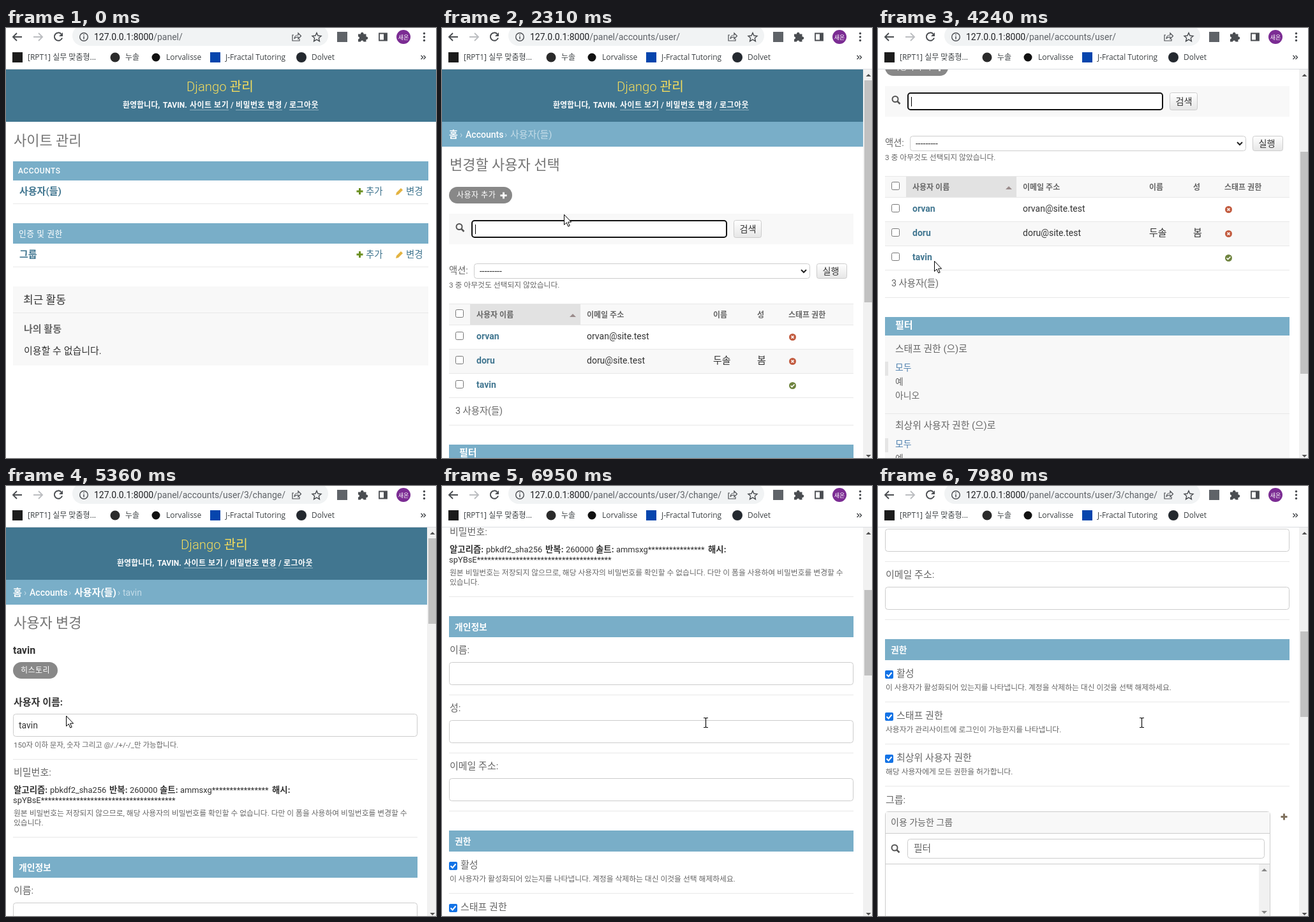
Write an HTML page that moves like this. It is 674 by 674 pixels and loops after 8000 ms.

```html
<!DOCTYPE html>
<html lang="ko">
<head>
<meta charset="utf-8">
<style>
  html, body { margin: 0; width: 100%; height: 100%; overflow: hidden; background: #fff; }
  svg { display: block; width: 100vw; height: 100vh; font-family: Roboto, 'Noto Sans CJK KR', sans-serif; }
  .b { font-weight: 700; }
  .m { font-weight: 500; }
  .l { font-weight: 300; }
  .sp { letter-spacing: .5px; }
  .bar { font-family: 'Open Sans', 'Noto Sans CJK KR', sans-serif; }
  .hover { fill: #003366; text-decoration: underline; }
</style>
</head>
<body>
<svg id="stage" viewBox="0 0 674 674"></svg>
<script>
const DARK = '#333', GREY = '#666', TITLE = '#747474', LINK = '#417690', CAP = '#79aec8', PALE = '#f8f8f8', RULE = '#e8e8e8';
const USER = 'tavin', DURATION = 8000;

// Drawing helpers, each returning SVG markup
const text = (x, y, size, str, fill = DARK, cls = '', more = '') =>
  `<text x="${x}" y="${y}" font-size="${size}" fill="${fill}" class="${cls}" ${more}>${str}</text>`;
const rect = (x, y, w, h, fill, more = '') =>
  `<rect x="${x}" y="${y}" width="${w}" height="${h}" fill="${fill}" ${more}/>`;
const frame = (x, y, w, h, stroke = '#ccc', fill = '#fff', r = 4) =>
  rect(x + .5, y + .5, w - 1, h - 1, fill, `stroke="${stroke}" rx="${r}"`);
const circle = (x, y, r, fill, more = '') => `<circle cx="${x}" cy="${y}" r="${r}" fill="${fill}" ${more}/>`;
const line = (d, stroke, width = 1, more = '') =>
  `<path d="${d}" fill="none" stroke="${stroke}" stroke-width="${width}" ${more}/>`;
const shape = (d, fill, more = '') => `<path d="${d}" fill="${fill}" ${more}/>`;
const group = (id, body, more = '') => `<g id="${id}" ${more}>${body}</g>`;
const rule = (y, w = 634) => rect(11, y, w, 1, RULE);
const plus = (x, y, fill, r = 5) => line(`M${x - r} ${y}h${2 * r}M${x} ${y - r}v${2 * r}`, fill, 3);
const lens = (x, y) => circle(x - 1, y - 1, 4.5, 'none', 'stroke="#555" stroke-width="2"') +
  line(`M${x + 2} ${y + 2}l4.5 4.5`, '#555', 2.5);
const button = (x, y, w, h, label) =>
  frame(x, y, w, h, '#ccc', 'url(#face)', 3) + text(x + 9.5, y + h / 2 + 5, 14.2, label);
const caption = (y, h, w, label, x, size, cls) =>
  rect(11, y, w, h, CAP) + text(x, y + h - 11, size, label, '#fff', cls);
const pill = (id, y, w, label) =>
  rect(11, y, w, 26, '#888', `rx="13" id="${id}"`) + text(23, y + 16.5, 12, label, '#fff', 'm sp');
const checkbox = (x, y, on) => on
  ? rect(x, y, 13, 13, '#1373e6', 'rx="2"') + line(`M${x + 2.5} ${y + 6.5}l3 3 5-6`, '#fff', 2)
  : frame(x, y, 13, 13, '#767676', '#fff', 2);

function header(width, dx) {
  const link = (x, w, label) => text(x, 125, 12, label, '#fff', 'b sp') + rect(x, 128, w, 1, '#8fb0c0');
  const slash = x => text(x, 125, 12, '/', '#fff', 'm');
  return rect(0, 65, width, 82, '#417690') + `<g transform="translate(${dx})">` +
    text(283, 99, 20.3, 'Django 관리', '#f5dd5d', 'l') +
    text(183, 125, 12, '환영합니다,', '#fff', 'b') +
    text(246, 125, 12, USER.toUpperCase() + '.', '#fff', 'b') +
    link(288, 61, '사이트 보기') + slash(352) +
    link(360, 73, '비밀번호 변경') + slash(436) +
    link(444, 46, '로그아웃') + '</g>';
}

function crumbs(deep) {
  const soft = '#c4dce8', y = 172;
  return rect(0, 147, 660, 39, CAP) +
    text(11, y, 15, '홈', '#fff', 'b') + text(28, y, 14, '›', soft) +
    text(37, y, 14, 'Accounts', '#fff', 'm') + text(98, y, 14, '›', soft) +
    text(107, y, 15, '사용자(들)', deep ? '#fff' : soft, deep ? 'b' : '') +
    (deep ? text(175, y, 14, '›', soft) + text(183, y, 14, USER, soft) : '');
}

function indexPage() {
  const actions = y => plus(554.5, y, '#6b8f20') + text(564, y + 5, 14.5, '추가', LINK) +
    shape(`M611 ${y + 6}l1-4 7-7 3 3-7 7z`, '#e3b341') + text(627, y + 5, 14.5, '변경', LINK);
  return header(674, 0) + text(12, 184, 22, '사이트 관리', TITLE, 'l') +
    caption(209, 30, 651, 'ACCOUNTS', 19, 12, 'm sp') +
    text(21, 261, 15, '사용자(들)', LINK, 'b', 'id="usersLink"') + actions(256) + rule(275, 651) +
    caption(306, 32, 651, '인증 및 권한', 20, 12.8, 'sp') +
    text(21, 360, 15, '그룹', LINK, 'b') + actions(355) + rule(374, 651) +
    rect(11, 405, 651, 124, PALE) + rule(446, 651) +
    text(27, 432, 17, '최근 활동') + text(28, 477, 15, '나의 활동', GREY, 'b') +
    text(28, 511, 15, '이용할 수 없습니다.');
}

function listPage() {
  const users = [['orvan', 'orvan@site.test', '', ''], ['doru', 'doru@site.test', '두솔', '봄'], [USER, '', '', '']];
  const rows = users.map(([name, mail, first, last], i) => {
    const y = 466 + i * 38, cy = y + 18.5, ok = name === USER;
    return (i === 1 ? rect(11, y, 634, 37, PALE) : '') + rule(y + 37) + checkbox(21, y + 10) +
      text(54, y + 22, 14, name, LINK, 'b', ok ? 'id="rowLink"' : '') + text(227, y + 22, 14, mail) +
      text(425, y + 22, 15, first) + text(494, y + 22, 15, last) +
      circle(549.5, cy, 5.5, ok ? '#6f843f' : '#c25b3f') +
      line(ok ? `M546.5 ${cy}l2 2 4-4` : `M547.5 ${cy - 2}l4 4m0-4l-4 4`, '#fff', 1.6);
  }).join('');
  const heads = [[54, '사용자 이름'], [227, '이메일 주소'], [425, '이름'], [494, '성'], [543, '스태프 권한']];
  const filter = (y, title) => text(27, y, 14.8, title, GREY) + rect(11, y + 15, 5, 22, '#e5e5e5') +
    ['모두', '예', '아니오'].map((s, i) => text(27, y + 29 + i * 22, 13.8, s, i ? GREY : '#4d7fae')).join('');
  return header(660, -9) + crumbs(false) +
    text(12, 222, 22, '변경할 사용자 선택', TITLE, 'l') +
    pill('addPill', 249, 99, '사용자 추가') + plus(96.5, 262.5, '#fff') +
    rect(11, 291, 634, 48, PALE) + lens(28, 312.5) +
    rect(47, 302, 399, 26, '#fff', 'rx="4" stroke="#111" stroke-width="2"') +
    rect(52, 308, 1, 15, '#000', 'id="caret"') + button(457, 301, 44, 28, '검색') +
    text(11, 385, 14.3, '액션:', GREY) + frame(50, 369, 527, 24) + text(59, 386, 14, '---------') +
    line('M563 379l4 4 4-4', '#222', 2) + button(587, 369, 48, 24, '실행') +
    text(11, 407, 11.8, '3 중 아무것도 선택되지 않았습니다.', GREY) +
    rect(11, 432, 634, 33, PALE) + rect(44, 432, 173, 33, '#e2e2e2') + rule(432) + rule(465) +
    checkbox(21, 441) + heads.map(([x, s]) => text(x, 454, 12, s, GREY, 'b')).join('') +
    shape('M200 453h10l-5-5z', '#9a8b8b') + rows +
    text(21, 605, 14.3, '3 사용자(들)', GREY) + rule(622) +
    rect(11, 682, 634, 220, PALE) + caption(653, 29, 634, '필터', 27, 15, 'b') +
    filter(708, '스태프 권한 (으)로') + rule(804) + filter(828, '최상위 사용자 권한 (으)로');
}

function changePage() {
  const field = (y, label) => text(12, y, 15, label, GREY) + frame(11, y + 14, 634, 36) + rule(y + 65);
  const help = (y, str) => text(12, y, 11.8, str, GREY);
  const flags = [
    ['활성', '이 사용자가 활성화되어 있는지를 나타냅니다. 계정을 삭제하는 대신 이것을 선택 해제하세요.'],
    ['스태프 권한', '사용자가 관리사이트에 로그인이 가능한지를 나타냅니다.'],
    ['최상위 사용자 권한', '해당 사용자에게 모든 권한을 허가합니다.']
  ].map(([label, hint], i) => {
    const y = 966 + i * 66;
    return checkbox(11, y, true) + text(29, y + 10, 15, label, GREY) + help(y + 31, hint) + rule(y + 49);
  }).join('');
  return header(660, -9) + crumbs(true) +
    text(12, 222, 22, '사용자 변경', TITLE, 'l') + text(11, 263, 16, USER, DARK, 'b') +
    pill('historyPill', 276, 70, '히스토리') +
    text(12, 344, 15, '사용자 이름:', DARK, 'b') + frame(11, 357, 634, 36) + text(20, 380, 14, USER) +
    text(12, 410, 11.5, '150자 이하 문자, 숫자 그리고 @/./+/-/_만 가능합니다.', GREY) + rule(428) +
    text(12, 454, 15, '비밀번호:', GREY) +
    [[12, '알고리즘:'], [162, '반복:'], [241, '솔트:'], [417, '해시:']]
      .map(([x, s]) => text(x, 481, 13.4, s, DARK, 'b')).join('') +
    [[69, 'pbkdf2_sha256'], [194, '260000'], [273, 'ammsxg' + '*'.repeat(16)]]
      .map(([x, s]) => text(x, 481, 12.9, s)).join('') +
    text(11, 497, 12.9, 'spYBsE' + '*'.repeat(38)) +
    help(517, '원본 비밀번호는 저장되지 않으므로, 해당 사용자의 비밀번호를 확인할 수 없습니다. 다만 이 폼을 사용하여 비밀번호를 변경할 수') +
    help(532, '있습니다.') + rule(550) +
    caption(581, 33, 634, '개인정보', 20, 13.8, 'b') +
    field(639, '이름:') + field(730, '성:') + field(821, '이메일 주소:') +
    caption(917, 33, 634, '권한', 20, 13.8, 'b') + flags +
    text(12, 1174, 15, '그룹:', GREY) + plus(636.5, 1195.5, '#80725f') +
    frame(11, 1187, 604, 300) + rect(12, 1188, 602, 33, PALE) + rect(12, 1221, 602, 1, '#ccc') +
    text(20, 1209, 14, '이용 가능한 그룹', GREY) +
    lens(27, 1245) + frame(46, 1230, 560, 31) + text(56, 1250, 14.8, '필터', GREY) +
    rect(12, 1269, 602, 1, '#ccc') + rect(597, 1270, 17, 200, '#f1f1f1') +
    shape('M601 1281h9l-4.5-4.5z', '#888') + shape('M601 1343h9l-4.5 4.5z', '#888');
}

function toolbar() {
  const ink = '#4a4d51';
  const arrow = (x, dir, color) => line(`M${x} 14h${14 * dir}M${x + 6 * dir} 8l${-6 * dir} 6 ${6 * dir} 6`, color, 1.9);
  const mark = (x, label) => text(x, 50, 12, label, '#3c4043', 'bar');
  return rect(0, 0, 674, 64, '#fff') + rect(0, 64, 674, 1, '#dadce0') +
    arrow(11, 1, ink) + arrow(57, -1, '#bcbec1') +
    group('reload', line('M86.5 9.2A6.2 6.2 0 1 0 88 15.5', ink, 2) + shape('M89 7v6h-6z', ink)) +
    group('stop', line('M76.5 8.5l11 11m0-11l-11 11', ink, 1.8)) +
    rect(104, -4, 401, 32, '#f1f3f4', 'rx="16"') +
    circle(122, 14, 6.3, 'none', `stroke="${ink}" stroke-width="1.4"`) + line('M122 10v1.6M122 13v4.5', ink, 1.5) +
    `<text x="138" y="19" font-size="14" fill="#202124">127.0.0.1:8000<tspan id="path" fill="#5f6368"></tspan></text>` +
    line('M451 11h-2v9h11v-3M452 17c0-4 3-6 6-6v-3l4.5 4.5-4.5 4.5v-3c-3 0-5 1-6 3z', ink, 1.2) +
    line('M487 7.5l2 4.5 5 .5-3.7 3.3 1.1 4.9-4.4-2.6-4.4 2.6 1.1-4.9-3.7-3.3 5-.5z', ink, 1.4) +
    rect(519, 6, 16, 16, '#5f6368') +
    shape('M552 9.5h4a2.3 2.3 0 1 1 4.5 0h4v4a2.3 2.3 0 1 1 0 4.5v3.5h-4.2a2 2 0 1 0-4.2 0h-4.1v-4a2 2 0 1 0 0-4z', ink) +
    line('M585 8.5h12v11h-12z', ink, 1.8) + rect(592, 8, 5, 12, ink) +
    circle(623, 14, 11, '#7b2c93') + text(623, 17.5, 9, '새온', '#fff', '', 'text-anchor="middle"') +
    [8.5, 14, 19.5].map(cy => circle(655.5, cy, 1.7, ink)).join('') +
    rect(10, 38, 16, 16, '#1c1c1c') + mark(34, '[RPT1] 실무 맞춤형...') +
    circle(171, 46, 7.5, '#2b2b2b') + mark(187, '누솔') +
    circle(235, 46, 6.5, '#111') + mark(251, 'Lorvalisse') +
    rect(320, 38, 16, 16, '#0645ad') + mark(344, 'J-Fractal Tutoring') +
    circle(463, 46, 8, '#24292f') + mark(479, 'Dolvet') +
    line('M650.5 43l3 3-3 3m4-6l3 3-3 3', ink, 1.5);
}

const pointers =
  group('arrow', shape('M.5 .5v16l3.7-3.5 2.6 6 2.4-1-2.6-5.8h5z', '#fff', 'stroke="#000"')) +
  group('hand', shape('M-1.5 13V2a1.7 1.7 0 0 1 3.4 0v6c1-1 3-.8 3.3 .6 1-.8 2.7-.5 3 .8 1.2-.5 2.6 .2 2.6 1.8v5c0 3-1.5 4-1.8 7.3H.5C0 20-3 18-5 14c-.8-2 1.2-3 2.2-2z', '#fff', 'stroke="#000" stroke-width="1.1"') +
    line('M1.9 8v5M5.2 9v4M8.2 10v3', '#000')) +
  group('beam', line('M-3-7.5h2.5l1 1 1-1H4M.5-6.5V6.5M-3 7.5h2.5l1-1 1 1H4', '#111', 1.2));

const stage = document.getElementById('stage');
stage.innerHTML = `<defs><clipPath id="view">${rect(0, 65, 674, 609, '#000')}</clipPath>
  <linearGradient id="face" x2="0" y2="1"><stop stop-color="#fff"/><stop offset="1" stop-color="#e6e6e6"/></linearGradient></defs>` +
  '<g clip-path="url(#view)">' +
  group('index', indexPage()) + group('list', listPage()) + group('change', changePage()) + '</g>' +
  group('scrollbar', rect(660, 65, 14, 609, '#f1f1f1') + rect(662, 82, 12, 100, '#c1c1c1', 'id="thumb"') +
    shape('M664.5 76h8l-4-4z', '#505050') + shape('M664.5 669h8l-4 4z', '#505050')) +
  toolbar() +
  group('status', rect(-5, 658, 214, 22, '#dee1e6', 'rx="4" id="statusBox"') +
    text(1, 673.5, 12, '', '#5f6368', '', 'id="statusText"')) +
  group('pointer', pointers);

const el = id => document.getElementById(id);
const show = (id, on) => el(id).setAttribute('display', on ? 'inline' : 'none');
const ease = (t, from, to) => {
  const p = Math.min(1, Math.max(0, (t - from) / (to - from)));
  return p * p * (3 - 2 * p);
};

const moves = [
  [200, 565, 676], [970, 69, 256], [2040, 69, 256], [2740, 435, 364], [2950, 435, 364], [3500, 415, 368],
  [3810, 415, 368], [4230, 88, 365], [4320, 88, 365], [4480, 70, 359], [5230, 70, 359], [5980, 366, 370],
  [6190, 366, 370], [6600, 413, 371], [DURATION, 413, 371]
];
function pointerAt(t) {
  const i = moves.findIndex(m => m[0] > t);
  if (i < 1) return [565, 690];
  const [t0, x0, y0] = moves[i - 1], [t1, x1, y1] = moves[i], p = ease(t, t0, t1);
  return [x0 + (x1 - x0) * p, y0 + (y1 - y0) * p];
}

// Wheel turns: page, start, end, distance
const wheel = [
  ['list', 2600, 2924, 100], ['list', 3000, 3400, 100],
  ['change', 5980, 6520, 300], ['change', 6810, 7143, 200], ['change', 7640, 8073, 200]
];
const scrollAt = (page, t) =>
  wheel.reduce((sum, [p, from, to, dist]) => sum + (p === page ? dist * ease(t, from, to) : 0), 0);

const base = '/panel/', listPath = base + 'accounts/user/';
function statusAt(t) {
  if (t >= 1030 && t < 1710) return [listPath, 209];
  if (t >= 1840 && t < 2180) return [listPath + 'add/', 234];
  if (t >= 4480 && t < 5230) return [listPath + '3/change/', 264];
  return null;
}

function render(t) {
  const page = t < 1710 ? 'index' : t < 5230 ? 'list' : 'change';
  for (const id of ['index', 'list', 'change']) show(id, id === page);

  const scroll = Math.round(scrollAt(page, t));
  el(page).setAttribute('transform', `translate(0 ${-scroll})`);
  show('scrollbar', page !== 'index');
  el('thumb').setAttribute('y', Math.round(82 + scroll * (page === 'list' ? .562 : .2155)));
  el('thumb').setAttribute('height', page === 'list' ? 348 : 134);

  el('path').textContent = { index: base, list: listPath, change: listPath + '3/change/' }[page];
  const loading = t >= 1170 && t < 1840 || t >= 4640 && t < 5300;
  show('stop', loading);
  show('reload', !loading);

  const status = statusAt(t);
  show('status', status);
  if (status) {
    el('statusText').textContent = '127.0.0.1:8000' + status[0];
    el('statusBox').setAttribute('width', status[1] + 5);
  }

  const overAdd = t >= 1840 && t < 2110, overRow = t >= 4430;
  el('usersLink').classList.toggle('hover', t >= 900);
  el('rowLink').classList.toggle('hover', overRow);
  el('addPill').setAttribute('fill', overAdd ? '#417690' : '#888');
  show('caret', t < 4640 && Math.floor((t - 1880) / 530) % 2 === 0);

  const kind = t >= 5450 ? 'beam' : t >= 900 && t < 2110 || overRow && t < 5230 ? 'hand' : 'arrow';
  for (const id of ['arrow', 'hand', 'beam']) show(id, id === kind);
  el('pointer').setAttribute('transform', `translate(${pointerAt(t).map(Math.round).join(' ')})`);
}

const start = performance.now();
function tick() {
  render((performance.now() - start) % DURATION);
  requestAnimationFrame(tick);
}
tick();
</script>
</body>
</html>
```
